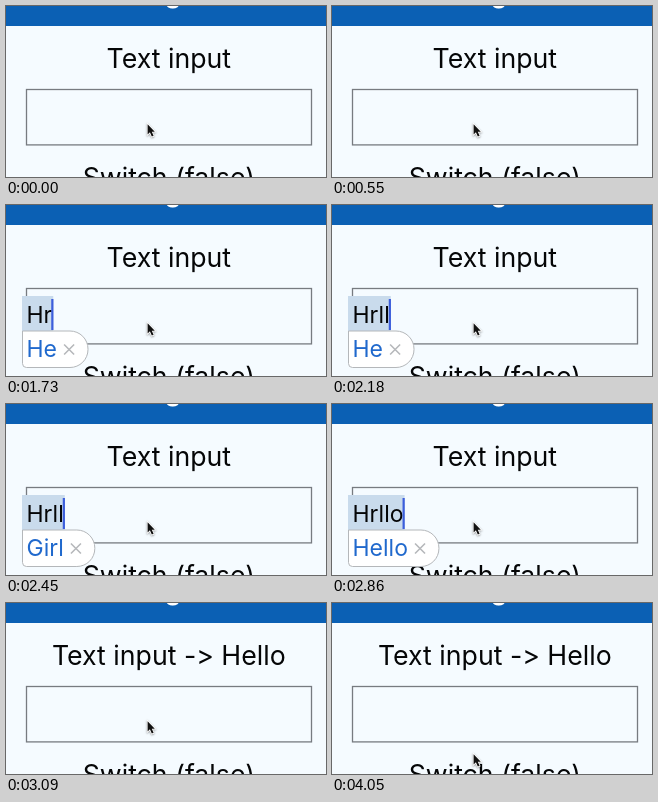
An HTML page with a canvas that plays this animation: 320 by 171 pixels, repeating every 4.55 s.

```html
<!DOCTYPE html>
<html lang="en">
<head>
<meta charset="utf-8">
<style>
  html, body { margin: 0; width: 100%; height: 100%; overflow: hidden; }
  canvas { display: block; width: 320px; height: 171px; }
</style>
</head>
<body>
<canvas width="320" height="171"></canvas>
<script>
const LOOP = 4550;
const ctx = document.querySelector('canvas').getContext('2d');
const INK = '#050607';
const COMMIT = 3040;

// What the field holds from each time on: [ms, text]
const typing = [[0, ''], [820, 'H'], [1200, 'Hr'], [1900, 'Hrl'], [2150, 'Hrll'],
  [2500, 'Hrllo'], [2900, 'Hello'], [COMMIT, '']];
// Autocorrect bubble: [from, to, suggestion]
const bubbles = [[1400, 2200, 'He'], [2200, 2620, 'Girl'], [2620, 2900, 'Hello']];

const clamp = v => Math.max(0, Math.min(1, v));
const ease = v => v * v * (3 - 2 * v);

function text(str, x, y, size, color = INK, align = 'left', weight = 400) {
  ctx.font = `${weight} ${size}px Inter, sans-serif`;
  ctx.textAlign = align;
  ctx.fillStyle = color;
  ctx.fillText(str, x, y);
}

const label = (str, y) => text(str, 162.8, y, 26.7, INK, 'center');

function box(x, y, w, h, color) {
  ctx.fillStyle = color;
  ctx.fillRect(x, y, w, h);
}

function drawField(t) {
  ctx.strokeStyle = '#777b80';
  ctx.lineWidth = 1.3;
  ctx.strokeRect(20.5, 83.5, 285, 55.4);

  const value = typing.findLast(([start]) => t >= start)[1];
  ctx.font = '23px Inter, sans-serif';
  const end = 20.5 + ctx.measureText(value).width;
  if (t >= 1360 && t < 2900) box(16, 91, end - 15, 35, '#c9dbec');
  text(value, 20.5, 118, 23);
  if (t >= 770 && t < COMMIT) box(end - 1, 94, 2.2, 31, '#3c5edb');
}

function drawBubble(t) {
  const bubble = bubbles.find(([from, to]) => t >= from && t < to);
  if (!bubble) return;
  const [, , word] = bubble;
  ctx.globalAlpha = clamp((t - bubbles[0][0]) / 120);
  ctx.font = '23px Inter, sans-serif';
  const width = ctx.measureText(word).width + 35;
  ctx.beginPath();
  ctx.roundRect(16.5, 126, width, 36.5, [0, 18, 18, 4]);
  ctx.fillStyle = '#fff';
  ctx.fill();
  ctx.strokeStyle = '#b4b7ba';
  ctx.lineWidth = 1;
  ctx.stroke();
  text(word, 20.5, 152.3, 23, '#2069cd');

  const x = width - 2.4, y = 144.5, r = 5;
  ctx.beginPath();
  ctx.moveTo(x - r, y - r);
  ctx.lineTo(x + r, y + r);
  ctx.moveTo(x + r, y - r);
  ctx.lineTo(x - r, y + r);
  ctx.strokeStyle = '#b6b8bb';
  ctx.lineWidth = 1.6;
  ctx.stroke();
  ctx.globalAlpha = 1;
}

function drawPointer(t) {
  const y = 118.2 + 33 * ease(clamp((t - 3890) / 160));
  ctx.save();
  ctx.translate(141.6, y);
  const arrow = new Path2D('M0 0V10.2L2.3 8.1L4.2 12.4L6 11.6L4.2 7.5H7.2Z');
  ctx.shadowColor = '#0006';
  ctx.shadowBlur = 2;
  ctx.shadowOffsetY = 0.8;
  ctx.strokeStyle = '#fff';
  ctx.lineWidth = 1.6;
  ctx.stroke(arrow);
  ctx.shadowColor = 'transparent';
  ctx.fillStyle = '#111';
  ctx.fill(arrow);
  ctx.restore();
}

function draw(now) {
  const t = now % LOOP;
  box(0, 0, 320, 171, '#f5fbff');
  box(0, 0, 320, 20, '#0b60b4');
  text('g', 167, -3.5, 26.5, '#fff', 'center', 600);
  // The zero-width non-joiner keeps "->" from becoming an arrow ligature
  label(t < COMMIT ? 'Text input' : 'Text input -\u200c> Hello', 62);
  label('Switch (false)', 180.5);
  drawField(t);
  drawBubble(t);
  drawPointer(t);
  requestAnimationFrame(draw);
}
requestAnimationFrame(draw);
</script>
</body>
</html>
```
